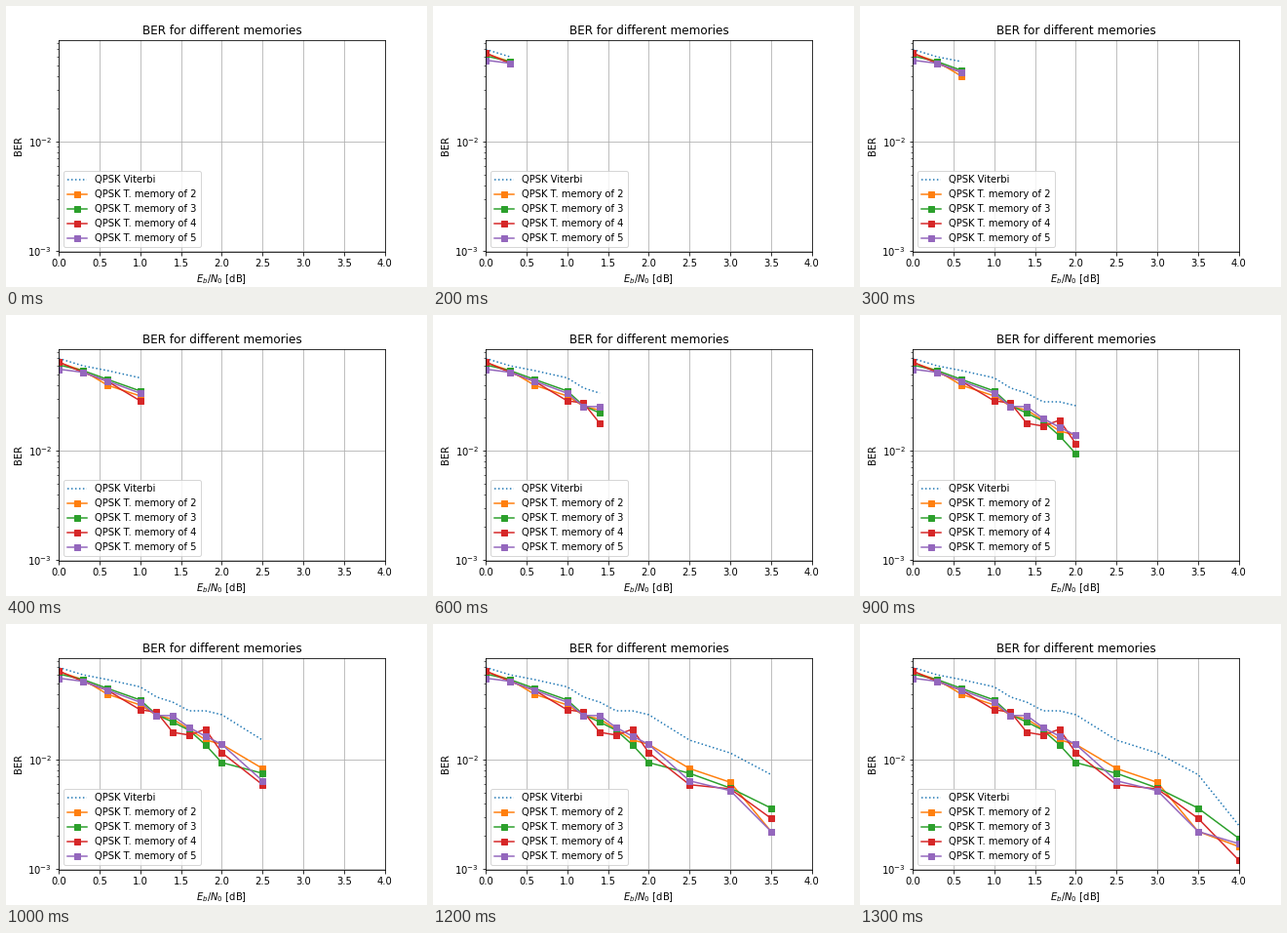
Recreate the animation shown at these times as a matplotlib script. Size 432 px wide and 288 px high, loop 1.89 s.

```python
import matplotlib.pyplot as plt
from matplotlib.animation import FuncAnimation

plt.rcParams.update({
    "font.family": "DejaVu Sans",
    "font.size": 10,
    "figure.subplot.bottom": 0.125,
    "figure.subplot.top": 0.88,
})

TICK_MS, STEP_MS, LOOP_MS = 10, 100, 1890

SNR_DB = [0, 0.3, 0.6, 1, 1.2, 1.4, 1.6, 1.8, 2, 2.5, 3, 3.5, 4]

# Bit error rates in units of 1e-4
CURVES = {
    "QPSK Viterbi":
        [700, 598, 541, 464, 375, 336, 280, 280, 258, 151, 115, 73, 25],
    "QPSK T. memory of 2":
        [640, 540, 397, 317, 255, 235, 190, 152, 138, 83, 62, 22, 16],
    "QPSK T. memory of 3":
        [610, 541, 449, 352, 258, 221, 186, 137, 94, 75, 55, 36, 19],
    "QPSK T. memory of 4":
        [650, 520, 431, 286, 273, 178, 168, 190, 116, 59, 54, 29, 12],
    "QPSK T. memory of 5":
        [557, 522, 433, 336, 254, 253, 197, 164, 138, 64, 52, 22, 17],
}

fig, ax = plt.subplots(figsize=(6, 4), dpi=72)
curves = []
for label, rates in CURVES.items():
    style = ":" if "Viterbi" in label else "s-"
    ber = [rate * 1e-4 for rate in rates]
    line, = ax.semilogy(SNR_DB, ber, style, label=label)
    curves.append((line, ber))

ax.set_xlim(0, 4)
ax.set_ylim(ax.get_ylim())
ax.set_title("BER for different memories")
ax.set_xlabel("$E_b/N_0$ [dB]")
ax.set_ylabel("BER")
ax.grid(True)
ax.legend(loc="lower left")


def update(frame):
    shown = min(frame * TICK_MS // STEP_MS, len(SNR_DB))
    for line, ber in curves:
        line.set_data(SNR_DB[:shown], ber[:shown])
    return [line for line, _ in curves]


animation = FuncAnimation(fig, update, frames=LOOP_MS // TICK_MS,
                          interval=TICK_MS, repeat=True, repeat_delay=0)
plt.show()
```
